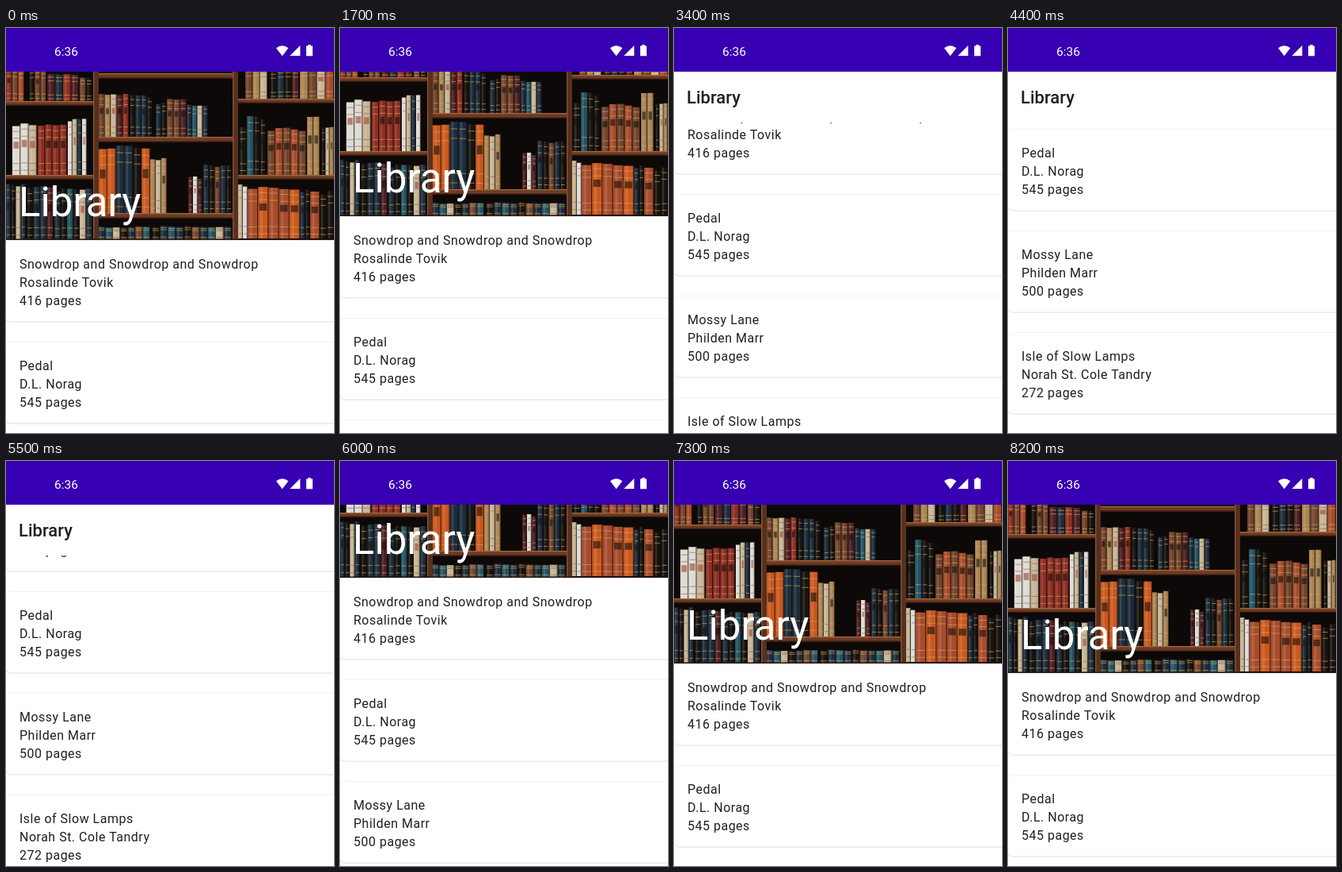
These frames come from a looping animation (414 by 510 pixels, 8300 ms). An HTML page:

```html
<!DOCTYPE html>
<html lang="en">
<head>
<meta charset="utf-8">
<title>Library</title>
<style>
  html, body { margin: 0; width: 100%; height: 100%; overflow: hidden; background: #fff; }
  svg { display: block; width: 414px; height: 510px; font-family: Roboto, sans-serif; }
  .line { font-size: 16px; letter-spacing: .5px; fill: #1f1f1f; }
  .big { font-size: 51px; fill: #fff; }
  .small { font-size: 22px; font-weight: 500; fill: #1f1f1f; }
  .clock { font-size: 15.5px; fill: #fff; }
</style>
</head>
<body>
<svg id="stage" viewBox="0 0 414 510">
  <g id="list"></g>
  <g id="bar">
    <rect y="55" width="414" height="64" fill="#fff"/>
    <text class="small" x="16" y="95">Library</text>
  </g>
  <g id="hero">
    <g id="photo"></g>
    <text class="big" x="16" y="237">Library</text>
  </g>
  <rect width="414" height="55" fill="#3700b3"/>
  <text class="clock" x="61" y="34.5">6:36</text>
  <g fill="#fff">
    <path d="M348.7 35.3 L341 25.3 Q348.7 19 356.4 25.3Z"/>
    <path d="M371.3 22 V35 H358.3Z"/>
    <path d="M381.3 21 h3.4 v1.6 h2.3 v12.6 h-8 v-12.6 h2.3z"/>
  </g>
</svg>
<script>
const LOOP = 8300, STEP = 100;
const HERO_BOTTOM = 267, COLLAPSE = 148, PITCH = 128;
const $ = id => document.getElementById(id);

function add(parent, tag, attrs, text) {
  const el = document.createElementNS('http://www.w3.org/2000/svg', tag);
  for (const k in attrs) el.setAttribute(k, attrs[k]);
  if (text) el.textContent = text;
  parent.appendChild(el);
  return el;
}
const box = (parent, x, y, width, height, fill, more) =>
  add(parent, 'rect', { x, y, width, height, fill, ...more });

// Cards
const books = [
  ['Snowdrop and Snowdrop and Snowdrop', 'Rosalinde Tovik', '416 pages'],
  ['Pedal', 'D.L. Norag', '545 pages'],
  ['Mossy Lane', 'Philden Marr', '500 pages'],
  ['Isle of Slow Lamps', 'Norah St. Cole Tandry', '272 pages']
];
books.forEach((lines, i) => {
  const top = HERO_BOTTOM + i * PITCH;
  box($('list'), -.5, top + 2, 430, 101.6, '#dcdcdc', { rx: 6 });
  box($('list'), -.5, top + .5, 430, 102, '#fff', { rx: 6, stroke: '#f1f1f1' });
  lines.forEach((s, n) =>
    add($('list'), 'text', { class: 'line', x: 17, y: top + 35.7 + n * 22.9 }, s));
});

// Bookcase
const photo = $('photo');
let seed = 7;
const rnd = () => (seed = seed * 16807 % 2147483647) / 2147483647;
const tones = {
  o: '#c9581f', r: '#8c2f22', b: '#70432c', t: '#a98353', w: '#dedbd4',
  n: '#1c2c3a', k: '#17130f', g: '#235263', m: '#4b1f22', c: '#c7b596', u: '#a64b2b'
};
// base line, then runs of [left, width, height, one tone per book]
const rows = [
  [92, [0, 23, 42, 'rbu'], [29, 22, 42, 'kbb'], [52, 40, 36, 'mnrm'], [93, 16, 30, 'bk']],
  [185, [8, 31, 65, 'wwc'], [40, 37, 66, 'rrrr'], [78, 24, 72, 'wcnw']],
  [267, [0, 25, 72, 'nkcn'], [26, 34, 68, 'knnm'], [61, 48, 66, 'nkgkcn']],
  [137, [117, 38, 56, 'btcmr'], [156, 29, 54, 'knnk'], [189, 14, 45, 'nk'],
    [203, 25, 48, 'bbm'], [228, 27, 43, 'ngcn']],
  [233, [117, 65, 85, 'oonnko'], [182, 21, 71, 'tct'], [230, 18, 46, 'mwm'], [249, 36, 61, 'nkbnk']],
  [267, [116, 66, 17, 'ngcknbg'], [184, 101, 18, 'kngnkbngcn']],
  [89, [302, 28, 40, 'btc'], [333, 37, 38, 'knkm'], [371, 43, 42, 'tbcu']],
  [185, [294, 10, 62, 'k'], [304, 9, 76, 'g'], [313, 15, 75, 'kk'], [330, 49, 60, 'bubub'],
    [380, 16, 74, 'tt'], [398, 16, 62, 'kct']],
  [265, [293, 12, 68, 'cw'], [305, 66, 66, 'uouuo'], [371, 13, 62, 'nk'],
    [384, 12, 62, 'u'], [396, 18, 60, 'kk']]
];

function drawBook(x, base, w, h, tone) {
  const y = base - h, pale = 'wc'.includes(tone);
  box(photo, x, y, w, h, tones[tone]);
  box(photo, x + w * .2, y, w * .25, h, '#fff', { opacity: .12 });
  box(photo, x + w - 1.2, y, 1.2, h, '#080605', { opacity: .65 });
  const band = pale ? '#8a6650' : '#d6a65d';
  for (const p of [.1, .24, .76, .9])
    box(photo, x + 1, y + h * p, w - 2.2, 1, band, { opacity: .65 });
  if (h > 40 && rnd() > .4)
    box(photo, x + 1.5, y + h * .32, Math.max(1, w - 3.7), h * .14,
      pale ? '#a2432f' : '#17110e', { opacity: .6 });
}

function plank(x, y, w, h) {
  box(photo, x, y, w, h, '#6d3b22');
  box(photo, x, y, w, 1.3, '#a1653d');
  box(photo, x, y + h - 1.5, w, 1.5, '#351a10');
}

box(photo, 0, 55, 414, 212, '#0d0908');
for (const [base, ...runs] of rows)
  for (const [left, width, height, kinds] of runs)
    [...kinds].forEach((tone, i) => {
      const w = width / kinds.length;
      drawBook(left + i * w, base, w, height - rnd() * Math.min(5, height * .1), tone);
    });
for (const y of [92, 185]) plank(0, y, 110, 6);
for (const y of [57, 137, 233]) plank(115, y, 172, 7);
for (const y of [89, 185]) plank(292, y, 122, 6);
for (const x of [110, 286]) {
  box(photo, x, 55, 7, 212, '#57301e');
  box(photo, x, 55, 1.5, 212, '#835033');
}
box(photo, 0, 265.5, 414, 1.5, '#28150e');

// Scroll distance at key times, joined by a monotone cubic
const keys = [[0, 0], [1150, 0], [1700, 30], [2700, 105], [4400, 268],
  [5200, 268], [6000, 120], [6800, 35], [7850, 0], [LOOP, 0]];
const slope = i => (keys[i + 1][1] - keys[i][1]) / (keys[i + 1][0] - keys[i][0]);
function tangent(i) {
  if (i < 1 || i > keys.length - 2) return 0;
  const a = slope(i - 1), b = slope(i);
  return a * b > 0 ? 2 * a * b / (a + b) : 0;
}
function scrollAt(t) {
  let i = 0;
  while (i < keys.length - 2 && t >= keys[i + 1][0]) i++;
  const [t0, a] = keys[i], [t1, b] = keys[i + 1];
  const d = t1 - t0, u = (t - t0) / d, v = 1 - u;
  return a * (1 + 2 * u) * v * v + b * u * u * (3 - 2 * u)
    + d * u * v * (v * tangent(i) - u * tangent(i + 1));
}

function draw() {
  const t = Math.floor(performance.now() % LOOP / STEP) * STEP;
  const s = Math.round(scrollAt(t));
  const collapsed = s >= COLLAPSE;
  const shift = `translate(0 ${-s})`;
  $('list').setAttribute('transform', shift);
  $('hero').setAttribute('transform', shift);
  $('hero').setAttribute('display', collapsed ? 'none' : 'inline');
  $('bar').setAttribute('display', collapsed ? 'inline' : 'none');
  requestAnimationFrame(draw);
}
draw();
</script>
</body>
</html>
```
